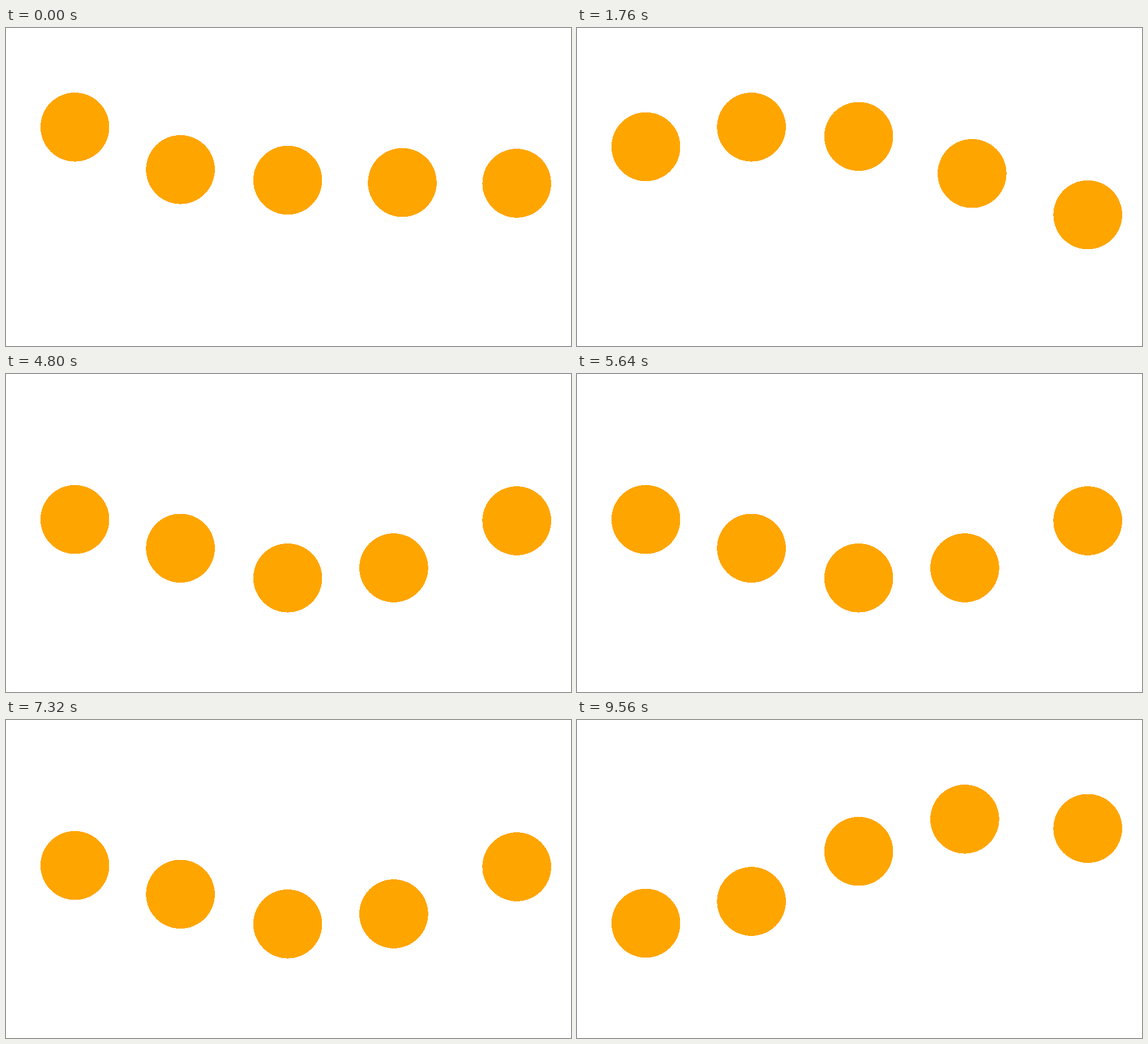
These frames come from a looping animation (998x561 px, 9600 ms). An HTML page:

```html
<!DOCTYPE html>
<html lang="en">
<head>
<meta charset="utf-8">
<title>Bouncing dots</title>
<style>
  html, body { margin: 0; width: 100%; height: 100%; overflow: hidden; background: #fff; }
  svg { display: block; width: 100%; height: 100%; }
</style>
</head>
<body>
<svg id="stage" viewBox="0 0 998 561" shape-rendering="crispEdges" fill="#ffa500"></svg>
<script>
const STEP = 40, STEPS = 240, CYCLE = 21;
const TOP = 174.8, RADIUS = 60.8;

// Height over one bounce: [step, y]
const bounce = [
  [0, TOP], [2, 209.5], [3, 231.7], [4, 259], [6, 320], [7, 342],
  [8, 358.5], [9, 365.2], [10, 359.8], [12, 329.6], [13, 307.3],
  [15, 256.7], [18, 191.3], [CYCLE, TOP]
];
const LOW_STEP = 9, LOW = 365.2;

// delay: step of the first top; bow: sideways swing while rising
const dots = [
  { x: 121.7, startX: 121.7, startY: TOP,   delay: 0,  bow: 0 },
  { x: 308.1, startX: 308.1, startY: 249.8, delay: 2,  bow: 0 },
  { x: 497.6, startX: 497.6, startY: 268.5, delay: 5,  bow: 0 },
  { x: 684.9, startX: 700,   startY: 272.6, delay: 8,  bow: 13.2 },
  { x: 902.2, startX: 902.2, startY: 273.9, delay: 11, bow: 0 }
];

const mix = (a, b, k) => a + (b - a) * k;
const smooth = k => k * k * (3 - 2 * k);

function slope(i) {
  const a = bounce[i - 1], b = bounce[i + 1];
  return a && b ? (b[1] - a[1]) / (b[0] - a[0]) : 0;
}

function heightAt(s) {
  let i = 0;
  while (i < bounce.length - 2 && s >= bounce[i + 1][0]) i++;
  const [s0, y0] = bounce[i], [s1, y1] = bounce[i + 1];
  const d = s1 - s0, k = (s - s0) / d, r = 1 - k;
  return mix(y0, y1, smooth(k)) + d * k * r * (slope(i) * r - slope(i + 1) * k);
}

function place(dot, step) {
  if (step < dot.delay) {
    const k = smooth(step / dot.delay);
    return [mix(dot.startX, dot.x, k), mix(dot.startY, TOP, k)];
  }
  const s = (step - dot.delay) % CYCLE;
  const y = heightAt(s);
  const rise = s > LOW_STEP ? (LOW - y) / (LOW - TOP) : 0;
  return [dot.x + dot.bow * 4 * rise * (1 - rise), y];
}

const stage = document.getElementById("stage");
for (const dot of dots) {
  dot.el = document.createElementNS(stage.namespaceURI, "circle");
  dot.el.setAttribute("r", RADIUS);
  stage.append(dot.el);
}

function draw(ms) {
  const step = Math.floor(ms / STEP + 0.001) % STEPS;
  for (const dot of dots) {
    const [x, y] = place(dot, step);
    dot.el.setAttribute("cx", x.toFixed(2));
    dot.el.setAttribute("cy", y.toFixed(2));
  }
}

let begin;
function tick(now) {
  begin ??= now;
  draw(Math.max(0, now - begin));
  requestAnimationFrame(tick);
}
draw(0);
requestAnimationFrame(tick);
</script>
</body>
</html>
```
